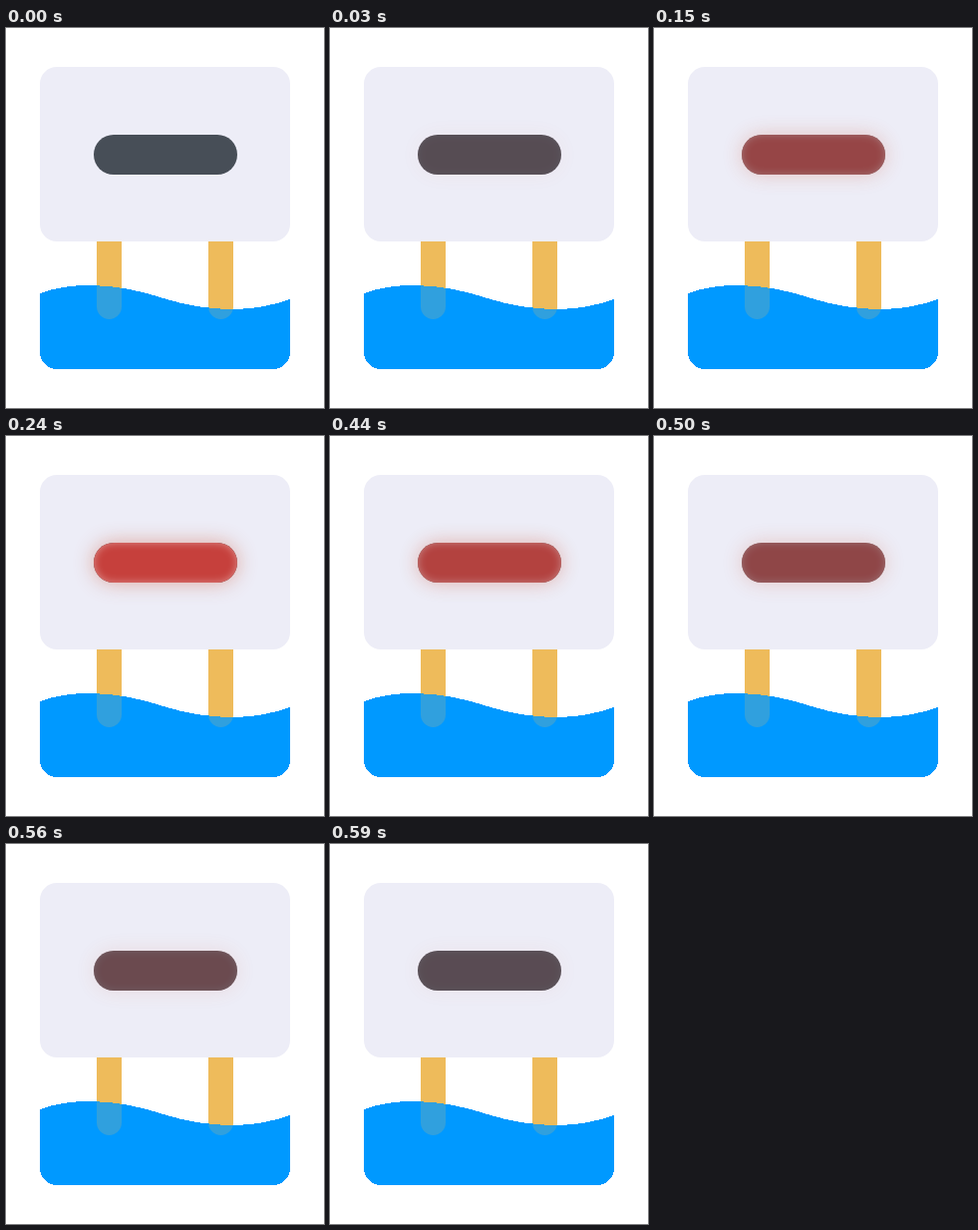
These frames come from a looping animation (319 by 381 pixels, 0.62 s). An HTML page:

```html
<!DOCTYPE html>
<html lang="en">
<head>
<meta charset="utf-8">
<title>Glowing sign</title>
<style>
  html, body {
    margin: 0;
    width: 100%;
    height: 100%;
    overflow: hidden;
    background: #fff;
  }
  svg {
    position: absolute;
    left: 0;
    top: 0;
  }
  .lamp, .glow {
    position: absolute;
    left: 88px;
    top: 107px;
    width: 144px;
    height: 40px;
    border-radius: 20px;
  }
  .lamp {
    background: #474e57;
  }
  .glow {
    background: #c6403c;
    box-shadow: 0 0 20px rgba(205, 85, 50, .45),
                inset 0 0 8px rgba(255, 255, 255, .4);
    opacity: 0;
    animation: pulse 620ms infinite;
  }
  /* Rises in 8 steps of 30 ms, holds, falls in 7 */
  @keyframes pulse {
    0%      { opacity: 0; animation-timing-function: steps(8, end); }
    38.709% { opacity: 1; animation-timing-function: linear; }
    66.129% { opacity: 1; animation-timing-function: steps(7, end); }
    100%    { opacity: 0; }
  }
</style>
</head>
<body>
<svg width="319" height="381" viewBox="0 0 319 381">
  <defs>
    <path id="legs" fill="#edbb5b" d="M91 200h25v79.5a12.5 12.5 0 0 1-25 0z
      M203 200h25v79.5a12.5 12.5 0 0 1-25 0z"/>
  </defs>
  <use href="#legs"/>
  <path fill="#09f" shape-rendering="crispEdges" d="M34 266
    C50 260 67 258 84 258
    C112 258 136 264 158 271
    C182 278.5 205 282 228 282
    C248 282 268 278 285 272
    V325a17 17 0 0 1-17 17H51a17 17 0 0 1-17-17z"/>
  <use href="#legs" opacity=".2"/>
  <rect x="34" y="39" width="251" height="175" rx="17" fill="#ededf7"/>
</svg>
<div class="lamp"></div>
<div class="glow"></div>
</body>
</html>
```
